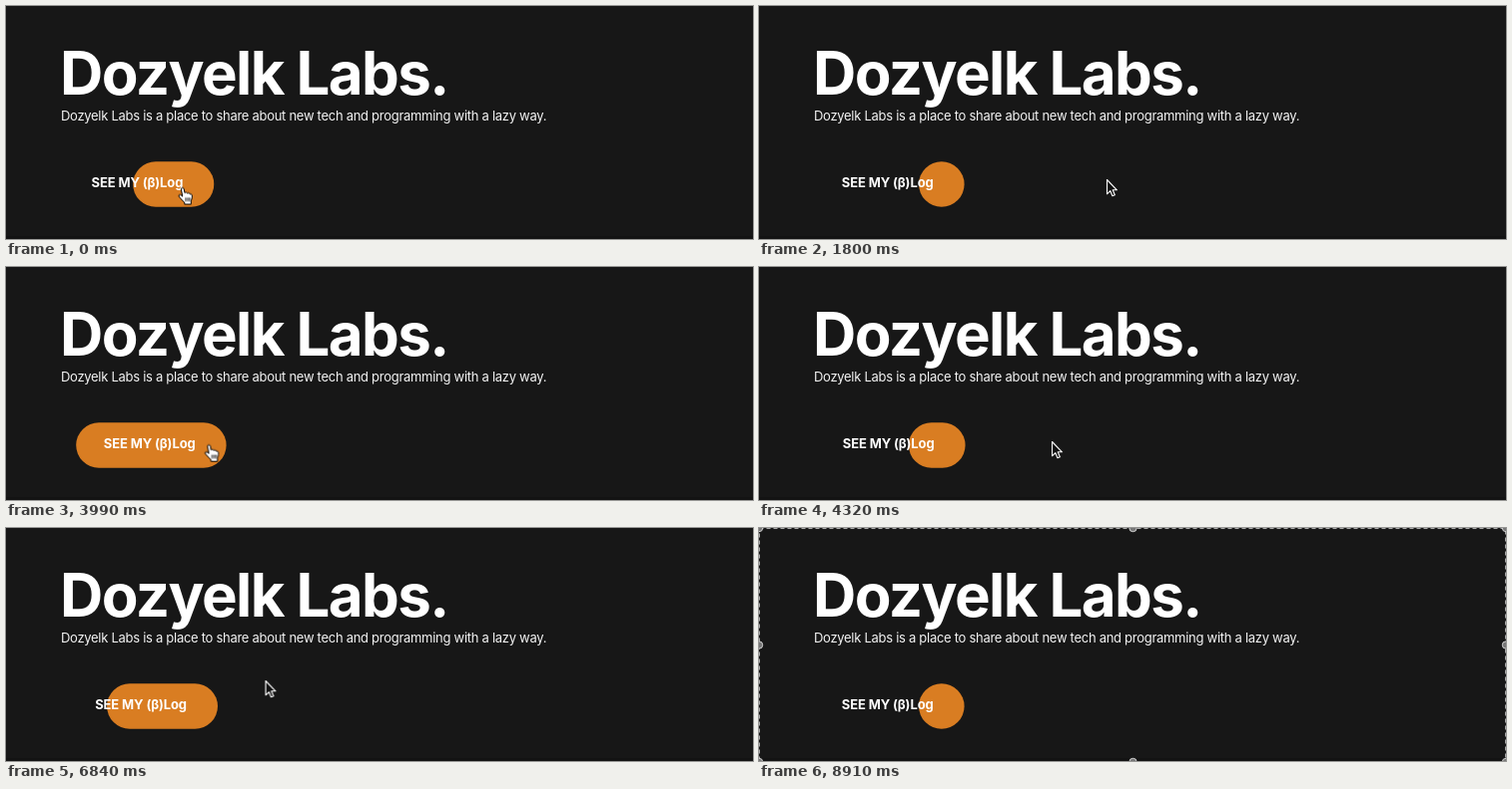
These frames come from a looping animation (748x234 px, 9.18 s). An HTML page:

```html
<!DOCTYPE html>
<html lang="en">
<head>
<meta charset="utf-8">
<title>Dozyelk Labs</title>
<style>
  html, body { margin: 0; width: 100%; height: 100%; overflow: hidden; background: #171717; }
  svg { display: block; width: 748px; height: 234px; }
  text { font-family: Inter, "Open Sans", sans-serif; fill: #fff; }
  .title { font-size: 60px; font-weight: 700; letter-spacing: -1.6px; }
  .lead { font-size: 13px; letter-spacing: -.285px; fill: #f4f4f4; }
  .label { font-size: 13px; font-weight: 700; letter-spacing: -.12px; }

  .cta, .pill, .cursor, .hand, .arrow, .crop { animation: 9180ms linear infinite; }
  .cta { animation-name: shift; }
  .pill { animation-name: grow; fill: #d97d22; }
  .cursor { animation-name: roam; }
  .hand { animation-name: hand; animation-timing-function: step-end; }
  .arrow { animation-name: arrow; animation-timing-function: step-end; }
  .crop { animation-name: crop; animation-timing-function: step-end; }

  /* hover widens the pill leftwards while the whole button slides right */
  @keyframes grow {
    0% { x: 125.6px; width: 80px; animation-timing-function: cubic-bezier(.15, .6, .4, 1); }
    2.55% { x: 55.2px; width: 150.4px; }
    14.71% { x: 55.2px; width: 150.4px; animation-timing-function: ease; }
    17.97% { x: 160px; width: 45.6px; }
    27.23% { x: 160px; width: 45.6px; animation-timing-function: ease; }
    30.5% { x: 55.2px; width: 150.4px; }
    45.07% { x: 55.2px; width: 150.4px; animation-timing-function: ease; }
    48.33% { x: 160px; width: 45.6px; }
    56.75% { x: 160px; width: 45.6px; animation-timing-function: ease; }
    60.02% { x: 55.2px; width: 150.4px; }
    73.75% { x: 55.2px; width: 150.4px; animation-timing-function: ease; }
    77.02%, 100% { x: 160px; width: 45.6px; }
  }
  @keyframes shift {
    0% { transform: translateX(2.6px); animation-timing-function: cubic-bezier(.25, .5, .4, 1); }
    2.55% { transform: translateX(15px); }
    14.71% { transform: translateX(15px); animation-timing-function: cubic-bezier(.2, .3, .15, 1); }
    17.97% { transform: none; }
    27.23% { transform: none; animation-timing-function: cubic-bezier(.38, .1, .3, 1); }
    30.5% { transform: translateX(15px); }
    45.07% { transform: translateX(15px); animation-timing-function: cubic-bezier(.2, .3, .15, 1); }
    48.33% { transform: none; }
    56.75% { transform: none; animation-timing-function: cubic-bezier(.38, .1, .3, 1); }
    60.02% { transform: translateX(15px); }
    73.75% { transform: translateX(15px); animation-timing-function: cubic-bezier(.2, .3, .15, 1); }
    77.02%, 100% { transform: none; }
  }

  @keyframes roam {
    0% { transform: translate(177px, 182.5px); animation-timing-function: ease-out; }
    3.27% { transform: translate(171px, 184px); }
    12.09% { transform: translate(171px, 184px); animation-timing-function: ease-in; }
    14.71% { transform: translate(220px, 180px); }
    17.97% { transform: translate(325px, 175px); animation-timing-function: ease-out; }
    19.61% { transform: translate(348px, 174px); }
    23.2% { transform: translate(348px, 174px); animation-timing-function: ease-in; }
    27.23% { transform: translate(205px, 178px); animation-timing-function: ease-out; }
    32.03% { transform: translate(165px, 180px); }
    37.58% { transform: translate(165px, 180px); animation-timing-function: ease-in; }
    45.07% { transform: translate(222px, 178px); }
    47.06% { transform: translate(293px, 175px); animation-timing-function: ease-out; }
    50% { transform: translate(302px, 175px); }
    53.59% { transform: translate(302px, 175px); animation-timing-function: ease-in; }
    56.75% { transform: translate(205px, 174px); }
    57.84% { transform: translate(169px, 175px); animation-timing-function: ease-out; }
    59.91% { transform: translate(160px, 178px); animation-timing-function: ease-in-out; }
    63.4% { transform: translate(165px, 180px); }
    72.22% { transform: translate(165px, 180px); animation-timing-function: ease-in; }
    73.75% { transform: translate(222px, 163px); }
    74.51% { transform: translate(259px, 153px); animation-timing-function: ease-out; }
    77.45% { transform: translate(340px, 158px); }
    85.95% { transform: translate(340px, 158px); animation-timing-function: ease-in; }
    89.22%, 100% { transform: translate(520px, -24px); }
  }
  @keyframes hand {
    0%, 27.23%, 56.75% { opacity: 1; }
    14.71%, 45.07%, 73.75%, 100% { opacity: 0; }
  }
  @keyframes arrow {
    0%, 27.23%, 56.75% { opacity: 0; }
    14.71%, 45.07%, 73.75%, 100% { opacity: 1; }
  }
  @keyframes crop {
    0% { opacity: 0; }
    90.52%, 100% { opacity: 1; }
  }
</style>
</head>
<body>
<svg viewBox="0 0 748 234">
  <rect width="748" height="234" fill="#171717"/>
  <rect y="231" width="748" height="3" fill="#131313"/>

  <text class="title" x="54" y="89">Dozyelk Labs.</text>
  <text class="lead" x="55" y="115">Dozyelk Labs is a place to share about new tech and programming with a lazy way.</text>

  <g class="cta">
    <rect class="pill" x="160" y="156.2" width="45.6" height="45.6" rx="22.8"/>
    <text class="label" x="82.8" y="182">SEE MY (β)Log</text>
  </g>

  <g class="cursor" stroke-linejoin="round">
    <path class="arrow" d="M.5.5V14.8L3.8 11.7 5.9 16.8 8.3 15.8 6.2 10.8H10.4Z" fill="#111" stroke="#fff" stroke-width="1.1"/>
    <g class="hand" stroke="#000">
      <path d="M-1.6 1.2C-1.6-.4.9-.4 1.2 1.2L2 5.2C2.6 4.2 4.2 4.4 4.5 5.5 5.2 4.8 6.7 5.1 7 6.3 8 5.8 9.2 6.5 9.3 7.8 9.5 10.4 8.8 12 8.3 13.2V16.5H1.8V14.8C0 13.3-1.8 11-3.6 9-4.8 7.6-3.2 6.3-1.9 7.2L-.3 8.6Z" fill="#fff"/>
      <path d="M3 9.8v3.8M5 9.8v3.8M6.9 9.8v3.8" stroke-width=".9"/>
    </g>
  </g>

  <g class="crop" stroke="#d0d0d0">
    <rect x=".5" y=".5" width="747" height="234" fill="none" stroke="#a8a8a8" stroke-dasharray="4 3"/>
    <g fill="#777">
      <circle cx="0" cy="0" r="3.7"/>
      <circle cx="374.5" cy="0" r="3.7"/>
      <circle cx="748" cy="0" r="3.7"/>
      <circle cx="0" cy="117.5" r="3.7"/>
      <circle cx="748" cy="117.5" r="3.7"/>
      <circle cx="0" cy="235" r="3.7"/>
      <circle cx="374.5" cy="235" r="3.7"/>
      <circle cx="748" cy="235" r="3.7"/>
    </g>
  </g>
</svg>
</body>
</html>
```
